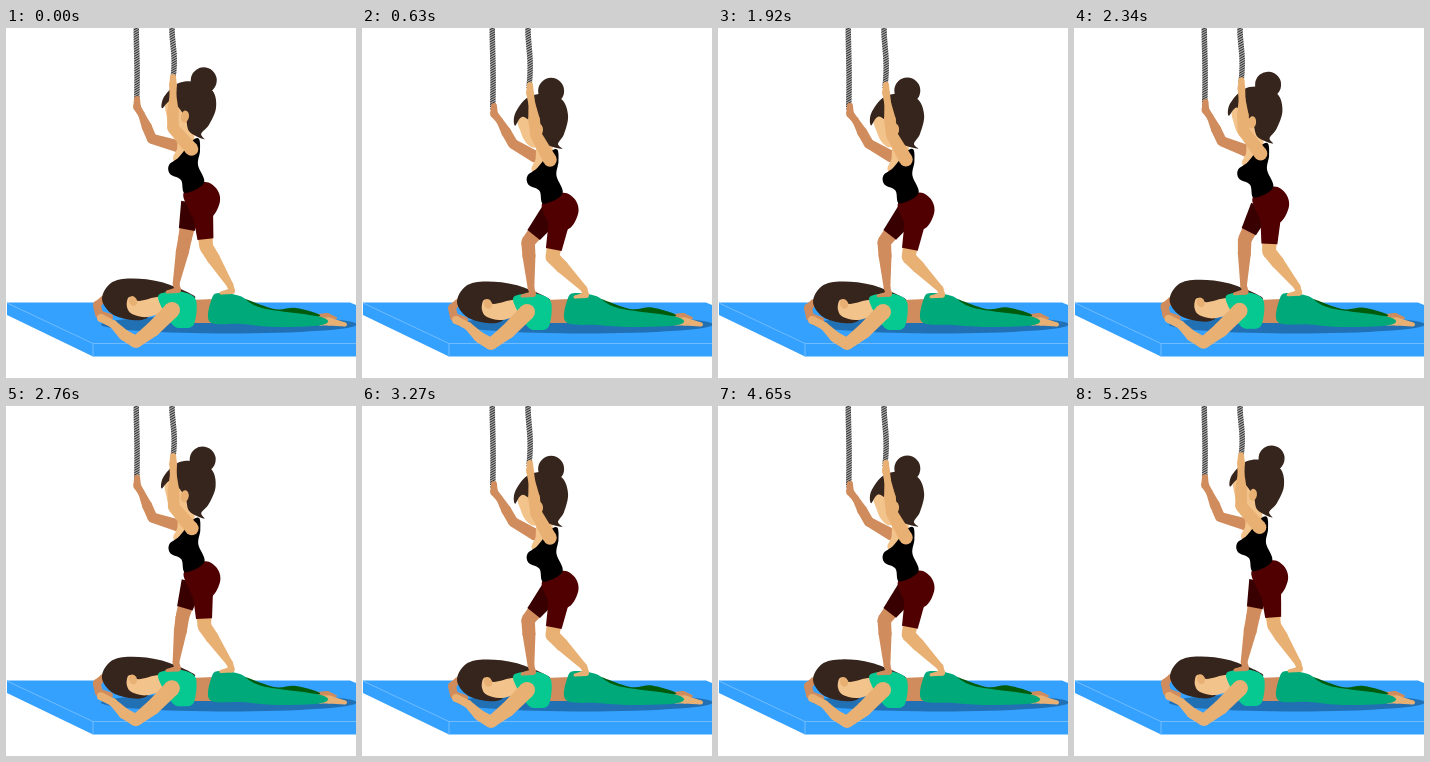
An HTML page with a canvas for the animation above (5.28 s loop, 350 px wide and 350 px high).

```html
<!DOCTYPE html>
<html lang="en">
<head>
<meta charset="utf-8">
<title>Back massage</title>
<style>
html, body { margin: 0; width: 100%; height: 100%; overflow: hidden; background: #fff; }
canvas { display: block; width: 100vw; height: 100vh; }
</style>
</head>
<body>
<canvas id="stage"></canvas>
<script>
const SIZE = 350, STEP = 30, LOOP = 5280, CYCLE = 2640;
const TURNS = [0, 650, 1390, 1960, CYCLE];
const FACE = '#f3c38c', SKIN = '#e9b074', TAN = '#d08c5c', HAIR = '#36251c';
const WINE = '#500000', DARK_WINE = '#380000';
const GREEN = '#00a97a', MINT = '#06c992', FOREST = '#005c0c';
const MAT = '#35a1ff', EDGE = '#70bcff', SHADE = '#2170b4';

const canvas = document.getElementById('stage');
const ctx = canvas.getContext('2d');

// 0 = upright, 1 = knees fully bent
function bendAt(ms) {
  const t = ms % CYCLE;
  const i = TURNS.findIndex((v, k) => t >= v && t < TURNS[k + 1]);
  const u = (t - TURNS[i]) / (TURNS[i + 1] - TURNS[i]);
  const eased = 0.4 * u + 0.3 * (1 - Math.cos(Math.PI * u));
  return i % 2 ? 1 - eased : eased;
}

const along = (a, b, t) => [a[0] + (b[0] - a[0]) * t, a[1] + (b[1] - a[1]) * t];

// Middle joint of a two-bone limb
function joint(a, b, first, second, side) {
  const dx = b[0] - a[0], dy = b[1] - a[1], d = Math.hypot(dx, dy);
  const cos = Math.min(1, (first * first + d * d - second * second) / (2 * first * d));
  const run = first * cos / d, rise = side * first * Math.sqrt(1 - cos * cos) / d;
  return [a[0] + dx * run - dy * rise, a[1] + dy * run + dx * rise];
}

function poly(color, ...pts) {
  ctx.beginPath();
  pts.forEach(p => ctx.lineTo(p[0], p[1]));
  ctx.closePath();
  ctx.fillStyle = color;
  ctx.fill();
}

function ball(color, x, y, rx, ry = rx, turn = 0) {
  ctx.beginPath();
  ctx.ellipse(x, y, rx, ry, turn, 0, Math.PI * 2);
  ctx.fillStyle = color;
  ctx.fill();
}

// Four-sided segment of given half widths
function taper(color, a, b, wa, wb) {
  const d = Math.hypot(b[0] - a[0], b[1] - a[1]);
  const nx = (a[1] - b[1]) / d, ny = (b[0] - a[0]) / d;
  poly(color, [a[0] + nx * wa, a[1] + ny * wa], [b[0] + nx * wb, b[1] + ny * wb],
    [b[0] - nx * wb, b[1] - ny * wb], [a[0] - nx * wa, a[1] - ny * wa]);
}

// Rounded chain of [x, y, radius] nodes
function limb(color, ...nodes) {
  nodes.forEach((n, i) => {
    ball(color, ...n);
    if (i) taper(color, nodes[i - 1], n, nodes[i - 1][2], n[2]);
  });
}

// Smooth closed curve through a few key points
function blob(color, ...pts) {
  const n = pts.length;
  const at = i => pts[(i + n) % n];
  ctx.beginPath();
  ctx.moveTo(...pts[0]);
  for (let i = 0; i < n; i++) {
    const a = at(i - 1), b = at(i), c = at(i + 1), d = at(i + 2);
    ctx.bezierCurveTo(
      b[0] + (c[0] - a[0]) / 6, b[1] + (c[1] - a[1]) / 6,
      c[0] - (d[0] - b[0]) / 6, c[1] - (d[1] - b[1]) / 6, c[0], c[1]);
  }
  ctx.fillStyle = color;
  ctx.fill();
}

function moved(x, y, turn, draw) {
  ctx.save();
  ctx.translate(x, y);
  ctx.rotate(turn);
  draw();
  ctx.restore();
}

function rope(x, end, sway) {
  const xAt = y => x + sway * Math.sin(2.4 * y / end) ** 2;
  const strand = (color, width, add) => {
    ctx.beginPath();
    add();
    ctx.lineWidth = width;
    ctx.strokeStyle = color;
    ctx.stroke();
  };
  strand('#a4a4a4', 5.4, () => {
    for (let y = 0; y <= end; y += 2) ctx.lineTo(xAt(y), y);
  });
  strand('#303030', 1, () => {
    for (let y = 0; y < end; y += 2.4) {
      ctx.moveTo(xAt(y) - 2.7, y + 2);
      ctx.lineTo(xAt(y) + 2.7, y - 1);
    }
  });
}

function drawMat() {
  const corner = [87, 315.5];
  poly(MAT, [1, 274.5], [344, 274.5], [350, 277], [350, 328.5], [87, 328.5], [1, 287]);
  ctx.strokeStyle = EDGE;
  ctx.lineWidth = 1;
  ctx.beginPath();
  for (const end of [[1, 275], [350, 315.5], [87, 328.5]]) {
    ctx.moveTo(...corner);
    ctx.lineTo(...end);
  }
  ctx.stroke();
  ball(SHADE, 223, 296.5, 128, 9);
}

function drawLyingHead() {
  limb(TAN, [97, 271, 3], [91, 277, 4], [93, 286, 4], [104, 289, 3]);
  blob(HAIR, [96, 271], [105, 255], [125, 250.5], [155, 254], [187, 267],
    [183, 272], [150, 276], [141, 290], [126, 292], [106, 286]);
  blob(FACE, [122, 270], [127, 269], [133, 273], [155, 269], [160, 282],
    [141, 289], [126, 286], [121, 279]);
  ball(SKIN, 127, 273, 4, 5, -0.4);
}

function drawLying(bend) {
  moved(-bend, 3 * bend, 0, drawLyingHead);
  limb(TAN, [312, 289, 3], [321, 288, 3], [330, 290, 1]);
  blob(FOREST, [235, 270], [268, 281], [290, 280 - bend / 2], [314, 288], [270, 290]);
  limb(SKIN, [314, 293.5, 4], [323, 293.5, 4], [339, 296.5, 2]);
  poly(TAN, [184, 272], [208, 271], [206, 295], [184, 295]);
  blob(GREEN, [206, 270], [214, 265], [234, 268], [256, 280], [315, 289],
    [316, 297], [270, 299], [235, 296 + bend], [204, 294]);
  moved(-bend, 2 * bend, 0, () => {
    blob(MINT, [152, 270], [162, 264], [177, 264], [190, 272], [188, 296], [177, 300], [166, 296]);
    limb(SKIN, [95, 290, 4], [107, 296, 4], [118, 307, 5.5], [130, 314, 6], [147, 301, 7.5], [166, 282, 8]);
  });
}

function drawHead() {
  blob(FACE, [-22, -6], [-20, 9], [-14, 20], [-5, 24], [10, 18], [4, -12]);
  ball(HAIR, 10, -33, 13);
  blob(HAIR, [-26, 2], [-26, -10], [-14, -26], [4, -30], [21, -24], [27, -8],
    [23, 10], [17, 20], [21, 25], [5, 20], [-2, 6], [-18, -7]);
  ball(SKIN, -2, 6, 4, 6);
}

function arm(color, shoulder, hand, upper, fore, width) {
  const elbow = joint(shoulder, hand, upper, fore, -1);
  limb(color, [hand[0], hand[1] - 5, 3], [hand[0], hand[1] + 3, 3.8],
    [...along(hand, elbow, 0.3), 3.4], [...along(hand, elbow, 0.65), width - 1],
    [...elbow, width - 1], [...shoulder, width]);
}

function leg(color, cloth, hip, ankle, thigh, shin, hem) {
  const knee = joint(hip, ankle, thigh, shin, 1);
  limb(color, [...along(hip, knee, 0.7), 7.5], [...knee, 6.8], [...along(knee, ankle, 0.3), 6.5],
    [...ankle, 3.3], [ankle[0] + 2, ankle[1] + 6, 3], [ankle[0] - 9, ankle[1] + 8, 1.5]);
  taper(cloth, hip, along(hip, knee, hem), 11, 8);
}

function drawStanding(bend) {
  const sx = 2.5 * bend, sy = 11 * bend;
  const body = (x, y) => [x + sx, y + sy];
  const farHand = [131 + bend, 76 + 7 * bend];
  const nearHand = [167 + bend, 54 + 8 * bend];

  rope(130.3, farHand[1] - 3, 0.8);
  rope(166, nearHand[1] - 3, 2.2);
  arm(TAN, body(171, 118), farHand, 26, 38, 6);
  leg(TAN, DARK_WINE, body(186, 175), [170 - bend, 256 + 4 * bend], 36, 46, 0.75);
  leg(SKIN, WINE, body(196, 176), [224 - 2 * bend, 257 + 4 * bend], 43, 45, 0.82);

  moved(sx, sy, 0, () => {
    blob(WINE, [178, 164], [198, 154], [210, 160], [214, 173], [206, 189], [190, 192], [182, 180]);
    limb(FACE, [180, 102, 8], [180, 123, 9], [174, 130, 7]);
    blob('#000', [186, 113], [193, 111], [194, 123], [192, 137], [198, 155], [179, 165],
      [175, 152], [164, 146], [163, 137], [173, 129]);
  });
  moved(182 - 3 * bend, 83 + 13 * bend, (1 - bend) * 0.18, drawHead);
  arm(SKIN, body(185.5, 121), nearHand, 28, 46, 6.8);
}

function render(ms) {
  const bend = bendAt(ms);
  ctx.setTransform(canvas.width / SIZE, 0, 0, canvas.height / SIZE, 0, 0);
  ctx.fillStyle = '#fff';
  ctx.fillRect(0, 0, SIZE, SIZE);
  drawMat();
  drawLying(bend);
  drawStanding(bend);
}

function resize() {
  const ratio = window.devicePixelRatio || 1;
  canvas.width = Math.round(innerWidth * ratio);
  canvas.height = Math.round(innerHeight * ratio);
}

let start = null;
function tick(now) {
  if (start === null) start = now;
  const t = (now - start) % LOOP;
  render(Math.floor(t / STEP) * STEP);
  requestAnimationFrame(tick);
}

addEventListener('resize', resize);
resize();
render(0);
requestAnimationFrame(tick);
</script>
</body>
</html>
```
